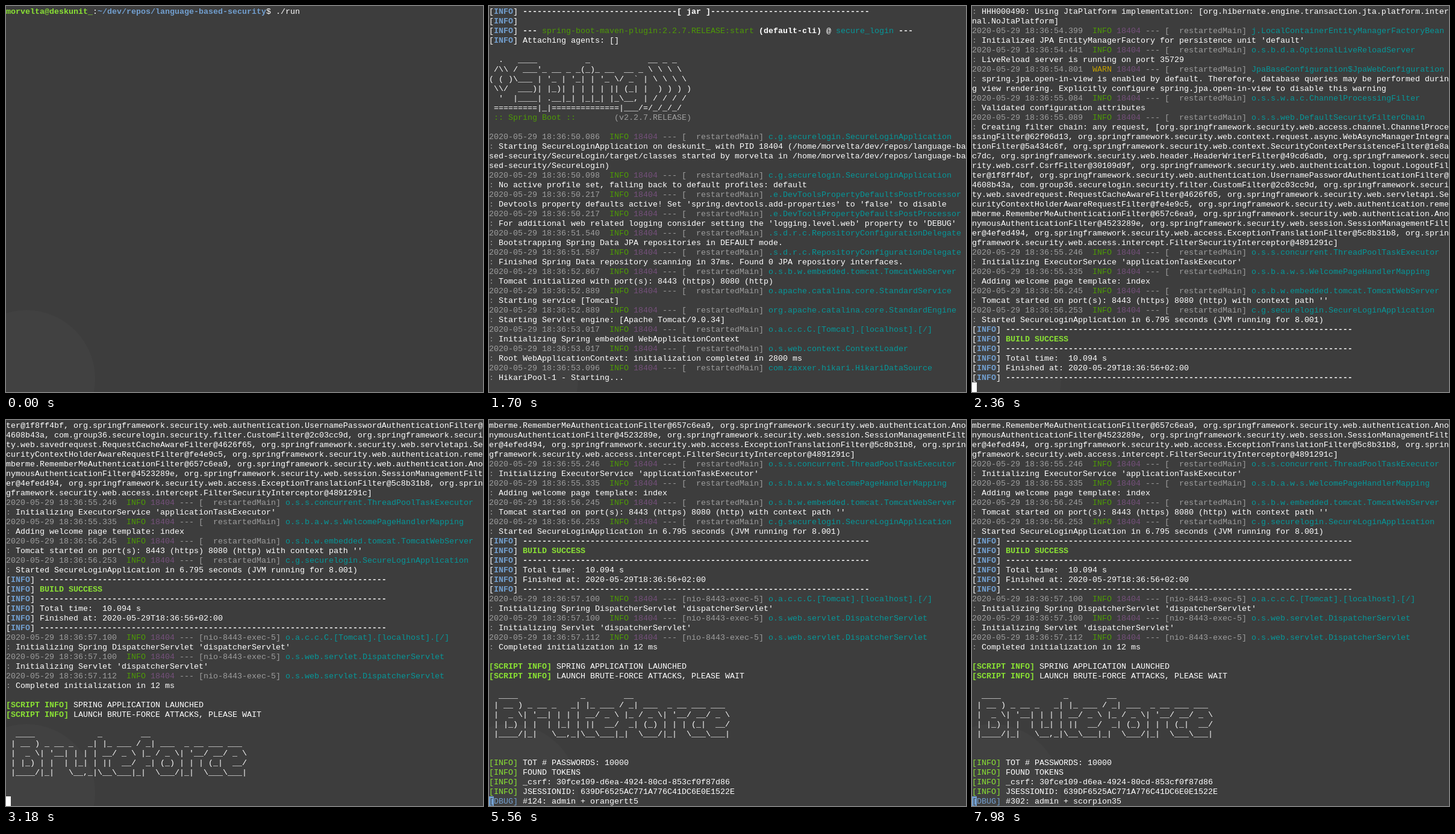
Recreate the animation shown at these times as an HTML page with a canvas. Size 792 by 641 pixels, loop 8000 ms.

```html
<!DOCTYPE html>
<html lang="en">
<head>
<meta charset="utf-8">
<title>Terminal session</title>
<style>
  html, body { margin: 0; width: 100%; height: 100%; overflow: hidden; background: #3d3d3d; }
  canvas { display: block; }
</style>
</head>
<body>
<canvas id="term" width="792" height="641"></canvas>
<script>
const ctx = document.getElementById("term").getContext("2d");
const LOOP = 8000, COLS = 99, ROWS = 40, CW = 8, CH = 16, TOP = 1, BASE = 12;
const BG = "#3d3d3d", BLUE = "#729fcf";
const FONT = '13.3333px "Liberation Mono", "DejaVu Sans Mono", monospace';

// Style codes, written in text as §code; [colour, bold]
const STYLES = {
  0: ["#ffffff"], b: ["#ffffff", true],
  B: [BLUE, true], s: [BLUE],
  G: ["#8ae234", true], l: ["#8ae234"], g: ["#4e9a06"],
  c: ["#06989a"], m: ["#75507b"], y: ["#c4a000"], d: ["#9e9e9e"]
};

// Splits marked-up text into rows of { col, text, style }, wrapped at COLS
function layout(str) {
  const rows = [[]];
  let col = 0, style = "0";
  str.split(/§(.)/).forEach((part, i) => {
    if (i % 2) { style = part; return; }
    while (part) {
      if (col === COLS) { rows.push([]); col = 0; }
      const text = part.slice(0, COLS - col);
      rows[rows.length - 1].push({ col, text, style });
      col += text.length;
      part = part.slice(text.length);
    }
  });
  return rows;
}

const lines = [];
function print(at, ...texts) {
  for (const text of texts) for (const runs of layout(text)) lines.push({ at, runs });
}

const info = text => "[§BINFO§0] " + text;
const rule = info("§b" + "-".repeat(72));
const script = text => "§G[SCRIPT INFO]§0 " + text;
const found = text => "§l[INFO]§0 " + text;

// Spring log entry; its timestamp also sets when it appears
function log(sec, source, msg, thread = "restartedMain", level = "§g INFO") {
  const at = Math.floor((2320 - (56.245 - sec) * 200) / 20) * 20;
  print(at,
    `§d2020-05-29 18:36:${sec.toFixed(3)} ${level} §m18404 §d--- [${thread.padStart(15)}] §c${source}`,
    `§d:§0 ${msg}`);
}

print(0, "§Gmorvelta@deskunit_§0:§B~/dev/repos/language-based-security§0$ ./run");
print(60, "", script("LAUNCH SPRING APPLICATION, PLEASE WAIT"));
const REFLECT = "com.google.inject.internal.cglib.core.$ReflectUtils$1";
print(200, "WARNING: An illegal reflective access operation has occurred",
  `WARNING: Illegal reflective access by ${REFLECT} (file:/usr/share/maven/lib/guice.jar) to method java.lang.ClassLoader.defineClass(java.lang.String,byte[],java.security.ProtectionDomain)`);
print(220, `WARNING: Please consider reporting this to the maintainers of ${REFLECT}`,
  "WARNING: Use --illegal-access=warn to enable warnings of further illegal reflective access operations");
print(240, "WARNING: All illegal access operations will be denied in a future release");
print(320, info("Scanning for projects..."));
print(420, info(""), info("§b----------------------< §ccom.group36:secure_login§b >----------------------"));
print(440, info("§bBuilding secure_login 0.0.1-SNAPSHOT"),
  info("§b" + "-".repeat(32) + "[ jar ]" + "-".repeat(33)));
print(640, info(""),
  info("§b--- §gspring-boot-maven-plugin:2.2.7.RELEASE:start§b (default-cli)§0 @ §csecure_login§b ---"));
print(800, info("Attaching agents: []"));

print(960, ...String.raw`
  .   ____          _            __ _ _
 /\\ / ___'_ __ _ _(_)_ __  __ _ \ \ \ \
( ( )\___ | '_ | '_| | '_ \/ _${"`"} | \ \ \ \
 \\/  ___)| |_)| | | | | || (_| |  ) ) ) )
  '  |____| .__|_| |_|_| |_\__, | / / / /
 =========|_|==============|___/=/_/_/_/
§g :: Spring Boot ::§d        (v2.2.7.RELEASE)
`.split("\n"));

const APP = "c.g.securelogin.SecureLoginApplication";
const DEVTOOLS = ".e.DevToolsPropertyDefaultsPostProcessor";
const REPOS = ".s.d.r.c.RepositoryConfigurationDelegate";
const TOMCAT = "o.s.b.w.embedded.tomcat.TomcatWebServer";
const HOST = "o.a.c.c.C.[Tomcat].[localhost].[/]";
const HIKARI = "com.zaxxer.hikari.HikariDataSource";
const SERVLET = "o.s.web.servlet.DispatcherServlet";
const EXEC = "nio-8443-exec-5";
const SEC = "org.springframework.security.web.";

log(50.086, APP, "Starting SecureLoginApplication on deskunit_ with PID 18404 (/home/morvelta/dev/repos/language-based-security/SecureLogin/target/classes started by morvelta in /home/morvelta/dev/repos/language-based-security/SecureLogin)");
log(50.098, APP, "No active profile set, falling back to default profiles: default");
log(50.217, DEVTOOLS, "Devtools property defaults active! Set 'spring.devtools.add-properties' to 'false' to disable");
log(50.217, DEVTOOLS, "For additional web related logging consider setting the 'logging.level.web' property to 'DEBUG'");
log(51.540, REPOS, "Bootstrapping Spring Data JPA repositories in DEFAULT mode.");
log(51.587, REPOS, "Finished Spring Data repository scanning in 37ms. Found 0 JPA repository interfaces.");
log(52.867, TOMCAT, "Tomcat initialized with port(s): 8443 (https) 8080 (http)");
log(52.889, "o.apache.catalina.core.StandardService", "Starting service [Tomcat]");
log(52.889, "org.apache.catalina.core.StandardEngine", "Starting Servlet engine: [Apache Tomcat/9.0.34]");
log(53.017, HOST, "Initializing Spring embedded WebApplicationContext");
log(53.017, "o.s.web.context.ContextLoader", "Root WebApplicationContext: initialization completed in 2800 ms");
log(53.096, HIKARI, "HikariPool-1 - Starting...");
log(53.351, HIKARI, "HikariPool-1 - Start completed.");
log(53.462, "o.hibernate.jpa.internal.util.LogHelper", "HHH000204: Processing PersistenceUnitInfo [name: default]");
log(53.774, "org.hibernate.Version", "HHH000412: Hibernate ORM core version 5.4.15.Final");
log(53.871, "o.hibernate.annotations.common.Version", "HCANN000001: Hibernate Commons Annotations {5.1.0.Final}");
log(54.022, "org.hibernate.dialect.Dialect", "HHH000400: Using dialect: org.hibernate.dialect.MySQL5Dialect");
log(54.392, "o.h.e.t.j.p.i.JtaPlatformInitiator", "HHH000490: Using JtaPlatform implementation: [org.hibernate.engine.transaction.jta.platform.internal.NoJtaPlatform]");
log(54.399, "j.LocalContainerEntityManagerFactoryBean", "Initialized JPA EntityManagerFactory for persistence unit 'default'");
log(54.441, "o.s.b.d.a.OptionalLiveReloadServer", "LiveReload server is running on port 35729");
log(54.801, "JpaBaseConfiguration$JpaWebConfiguration", "spring.jpa.open-in-view is enabled by default. Therefore, database queries may be performed during view rendering. Explicitly configure spring.jpa.open-in-view to disable this warning", "restartedMain", "§y WARN");
log(55.084, "o.s.s.w.a.c.ChannelProcessingFilter", "Validated configuration attributes");
log(55.089, "o.s.s.web.DefaultSecurityFilterChain", "Creating filter chain: any request, [" + [
  SEC + "access.channel.ChannelProcessingFilter@62f06d13",
  SEC + "context.request.async.WebAsyncManagerIntegrationFilter@5a434c6f",
  SEC + "context.SecurityContextPersistenceFilter@1e8ac7dc",
  SEC + "header.HeaderWriterFilter@49cd6adb",
  SEC + "csrf.CsrfFilter@30109d9f",
  SEC + "authentication.logout.LogoutFilter@1f8ff4bf",
  SEC + "authentication.UsernamePasswordAuthenticationFilter@4608b43a",
  "com.group36.securelogin.security.filter.CustomFilter@2c03cc9d",
  SEC + "savedrequest.RequestCacheAwareFilter@4626f65",
  SEC + "servletapi.SecurityContextHolderAwareRequestFilter@fe4e9c5",
  SEC + "authentication.rememberme.RememberMeAuthenticationFilter@657c6ea9",
  SEC + "authentication.AnonymousAuthenticationFilter@4523289e",
  SEC + "session.SessionManagementFilter@4efed494",
  SEC + "access.ExceptionTranslationFilter@5c8b31b8",
  SEC + "access.intercept.FilterSecurityInterceptor@4891291c"
].join(", ") + "]");
log(55.246, "o.s.s.concurrent.ThreadPoolTaskExecutor", "Initializing ExecutorService 'applicationTaskExecutor'");
log(55.335, "o.s.b.a.w.s.WelcomePageHandlerMapping", "Adding welcome page template: index");
log(56.245, TOMCAT, "Tomcat started on port(s): 8443 (https) 8080 (http) with context path ''");
log(56.253, APP, "Started SecureLoginApplication in 6.795 seconds (JVM running for 8.001)");
print(2340, rule, info("§GBUILD SUCCESS"), rule);
print(2360, info("Total time:  10.094 s"), info("Finished at: 2020-05-29T18:36:56+02:00"), rule);
log(57.100, HOST, "Initializing Spring DispatcherServlet 'dispatcherServlet'", EXEC);
log(57.100, SERVLET, "Initializing Servlet 'dispatcherServlet'", EXEC);
log(57.112, SERVLET, "Completed initialization in 12 ms", EXEC);

print(2700, "", script("SPRING APPLICATION LAUNCHED"));
print(2920, script("LAUNCH BRUTE-FORCE ATTACKS, PLEASE WAIT"));
print(3060, ...String.raw`
  ____             _        __
 | __ ) _ __ _   _| |_ ___ / _| ___  _ __ ___ ___
 |  _ \| '__| | | | __/ _ \ |_ / _ \| '__/ __/ _ \
 | |_) | |  | |_| | ||  __/  _| (_) | | | (_|  __/
 |____/|_|   \__,_|\__\___|_|  \___/|_|  \___\___|

`.split("\n"));
print(3400, found("TOT # PASSWORDS: 10000"));
print(3680, found("FOUND TOKENS"));
print(3700, found("_csrf: 30fce109-d6ea-4924-80cd-853cf0f87d86"));
print(3720, found("JSESSIONID: 639DF6525AC771A776C41DC6E0E1522E"));

const GUESS_START = 3760;
const WORDS = ("monkey 123456 password 12345678 qwerty dragon baseball football letmein abc123 shadow master " +
  "111111 sunshine scorpion 1234567 trustno1 hunter buster soccer killer hockey chicago access " +
  "ranger summer secret freedom orange ginger cookie silver purple banana cheese yellow " +
  "golden computer internet diamond thunder welcome phoenix bigdog winter guitar flower coffee").split(" ");
const PACE = [[3760, 1], [3780, 2], [4140, 2], [4160, 3], [5560, 124], [6780, 214], [7040, 214], [7060, 216], [7980, 302]];

function guessCount(t) {
  const q = Math.floor(t / 20) * 20;
  const i = Math.max(1, PACE.findIndex(p => q <= p[0]));
  const [t0, n0] = PACE[i - 1], [t1, n1] = PACE[i];
  return Math.round(n0 + (n1 - n0) * (q - t0) / (t1 - t0));
}

// Each guess overwrites the row, so the end of longer ones stays behind
function guessRow(t) {
  const n = guessCount(t), word = WORDS[n % WORDS.length];
  const tail = n < 10 ? "" : n < 75 ? "rtt" : n < 190 ? "rtt5" : "rt35";
  return layout(`§s[DBUG]§0 #${n}: admin + ${word}${tail.slice(word.length - 6)}`)[0];
}

function drawRow(runs, row) {
  for (const { col, text, style } of runs) {
    const [color, bold] = STYLES[style];
    ctx.font = (bold ? "bold " : "") + FONT;
    ctx.fillStyle = color;
    ctx.fillText(text, col * CW, TOP + row * CH + BASE);
  }
}

const CURSOR_ON = [[60, 440], [800, 960], [1820, 4160], [4280, LOOP]];

function draw(t) {
  ctx.fillStyle = BG;
  ctx.fillRect(0, 0, 792, 641);
  ctx.fillStyle = "#414141";
  ctx.beginPath();
  ctx.arc(34, 619, 114, 0, Math.PI * 2);
  ctx.fill();

  const shown = lines.filter(line => line.at <= t).length;
  const scroll = Math.max(0, shown - ROWS + 1);
  for (let i = scroll; i < shown; i++) drawRow(lines[i].runs, i - scroll);

  const row = shown - scroll, guessing = t >= GUESS_START;
  if (guessing) drawRow(guessRow(t), row);
  if (CURSOR_ON.some(([from, to]) => t >= from && t < to)) {
    ctx.fillStyle = guessing ? BLUE : "#ffffff";
    ctx.fillRect(0, TOP + row * CH, CW, CH);
    if (guessing) {
      ctx.font = FONT;
      ctx.fillStyle = BG;
      ctx.fillText("[", 0, TOP + row * CH + BASE);
    }
  }
}

const start = performance.now();
function tick() {
  draw((performance.now() - start) % LOOP);
  requestAnimationFrame(tick);
}
tick();
</script>
</body>
</html>
```
